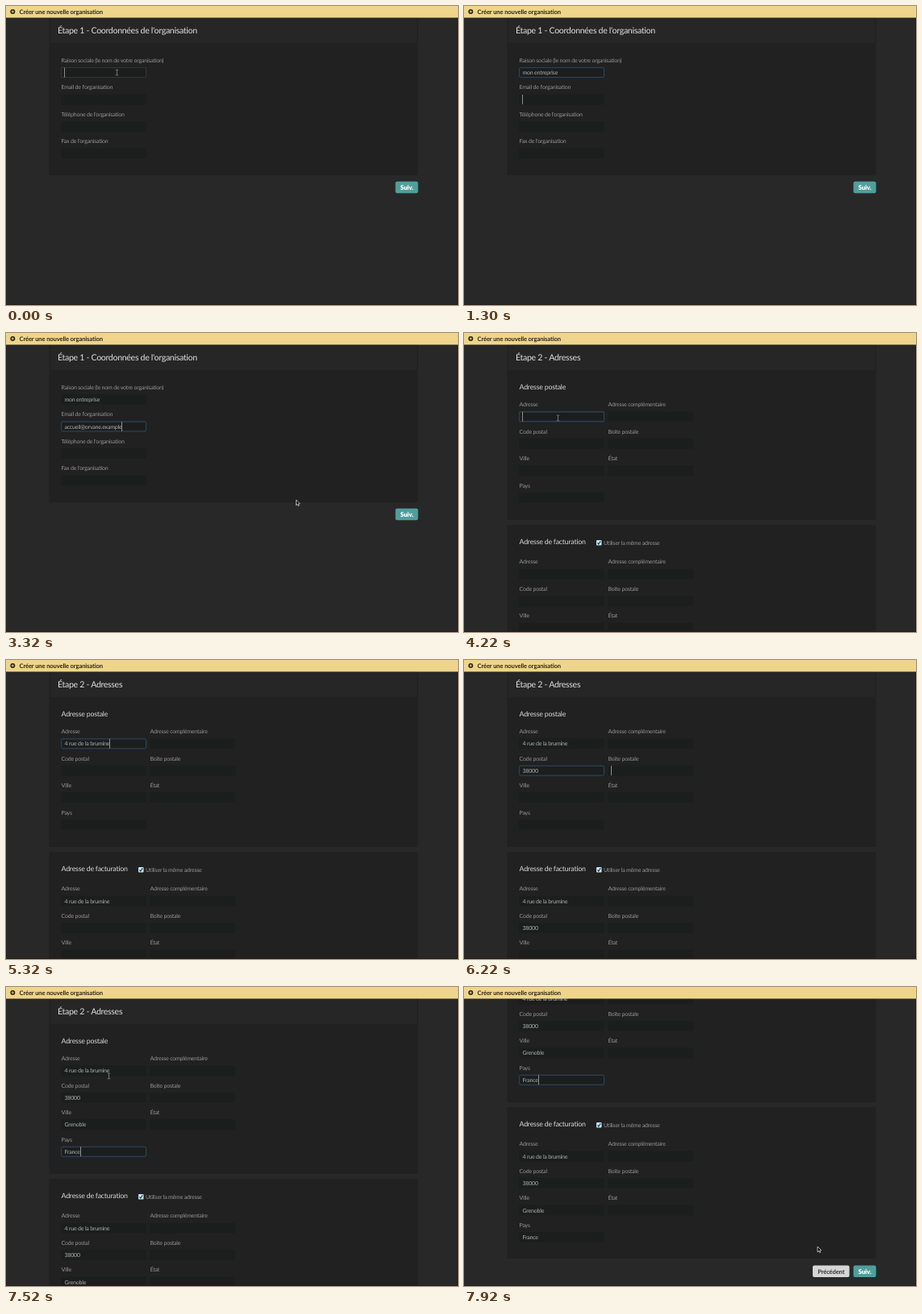
Write an HTML page with a canvas that moves like this. It is 560 by 371 pixels and loops after 8000 ms.

```html
<!DOCTYPE html>
<html lang="fr">
<head>
<meta charset="utf-8">
<title>Créer une nouvelle organisation</title>
<style>
  html, body { margin: 0; width: 100%; height: 100%; overflow: hidden; background: #282828; }
  canvas { display: block; width: 560px; height: 371px; }
</style>
</head>
<body>
<canvas id="stage"></canvas>
<script>
const W = 560, H = 371, LOOP = 8000;
const canvas = document.getElementById('stage');
const ctx = canvas.getContext('2d');
const dpr = window.devicePixelRatio || 1;
canvas.width = W * dpr;
canvas.height = H * dpr;

const FAMILY = 'Lato, "Open Sans", sans-serif';
const STYLES = {
  banner:  { weight: 700, size: 7.6, gap: -0.12, color: '#2c2718' },
  title:   { weight: 400, size: 10.6, gap: -0.32, color: '#dedede' },
  heading: { weight: 400, size: 8.8, gap: -0.22, color: '#d8d8d8' },
  label:   { weight: 400, size: 7, gap: -0.2, color: '#959595' },
  value:   { weight: 400, size: 7, gap: -0.2, color: '#b0b0b0' },
  light:   { weight: 900, size: 8, gap: -0.2, color: '#ffffff' },
  dark:    { weight: 700, size: 7.6, gap: -0.15, color: '#333333' }
};

const COL = [68, 178], ROW = 33.5, FIELD_W = 106, FIELD_H = 13;
const SWITCH = 3620;

const contactFields = [
  { label: 'Raison sociale (le nom de votre organisation)', col: 0, row: 0 },
  { label: "Email de l'organisation", col: 0, row: 1 },
  { label: "Téléphone de l'organisation", col: 0, row: 2 },
  { label: "Fax de l'organisation", col: 0, row: 3 }
];
const addressFields = [
  { label: 'Adresse', col: 0, row: 0 },
  { label: 'Adresse complémentaire', col: 1, row: 0 },
  { label: 'Code postal', col: 0, row: 1 },
  { label: 'Boîte postale', col: 1, row: 1 },
  { label: 'Ville', col: 0, row: 2 },
  { label: 'État', col: 1, row: 2 },
  { label: 'Pays', col: 0, row: 3 }
];

// Each visit to a field: focus span, then the typing span.
const contactEdits = [
  { field: 0, focus: 0, blur: 1300, text: 'mon entreprise', from: 210, to: 1180 },
  { field: 1, focus: 1300, blur: 9999, text: 'accueil@orvane.example', from: 1450, to: 3100 }
];
const addressEdits = [
  { field: 0, focus: 4060, blur: 5420, text: '4 rue de la brumine', from: 4330, to: 5260 },
  { field: 1, focus: 5420, blur: 5620, text: '', from: 0, to: 1 },
  { field: 2, focus: 5620, blur: 6220, text: '38000', from: 5680, to: 6120 },
  { field: 3, focus: 6220, blur: 6320, text: '', from: 0, to: 1 },
  { field: 4, focus: 6320, blur: 6920, text: 'Grenoble', from: 6400, to: 6820 },
  { field: 5, focus: 6920, blur: 7020, text: '', from: 0, to: 1 },
  { field: 6, focus: 7020, blur: 9999, text: 'France', from: 7080, to: 7400 }
];

// Pointer paths as [time, x, y]; hidden while typing.
const paths = [
  [[0, 137.5, 82.5], [299, 137.5, 82.5]],
  [[3120, 137.5, 82.5], [3320, 359.5, 207], [3520, 496, 223], [3720, 496, 223], [4120, 116.5, 105.5], [4400, 116.5, 105.5]],
  [[7420, 118, 106], [7520, 127.5, 110.5], [7620, 210, 170], [7820, 425, 315], [7920, 438, 322], [8000, 438, 322]]
];

const clamp = v => Math.max(0, Math.min(1, v));
const smooth = v => v * v * (3 - 2 * v);
const tick = t => t < 2120 ? Math.floor(t / 100) * 100 : Math.floor((t - 20) / 100) * 100 + 20;

function box(x, y, w, h, fill, radius = 0) {
  ctx.fillStyle = fill;
  ctx.beginPath();
  ctx.roundRect(x, y, w, h, radius);
  ctx.fill();
}

function line(points, color, width) {
  ctx.strokeStyle = color;
  ctx.lineWidth = width;
  ctx.beginPath();
  points.forEach(([x, y]) => ctx.lineTo(x, y));
  ctx.stroke();
}

function setStyle(name) {
  const s = STYLES[name];
  ctx.font = `${s.weight} ${s.size}px ${FAMILY}`;
  ctx.letterSpacing = s.gap + 'px';
  ctx.textRendering = 'geometricPrecision';
  ctx.fillStyle = s.color;
}

function text(str, x, y, name, align = 'left') {
  setStyle(name);
  ctx.textAlign = align;
  ctx.fillText(str, x, y);
  return ctx.measureText(str).width;
}

function pointerAt(t) {
  for (const path of paths) {
    for (let i = 1; i < path.length; i++) {
      const [t0, x0, y0] = path[i - 1], [t1, x1, y1] = path[i];
      if (t >= t0 && t <= t1) {
        const k = smooth((t - t0) / (t1 - t0));
        return { x: x0 + (x1 - x0) * k, y: y0 + (y1 - y0) * k };
      }
    }
  }
  return null;
}

function inside(p, x, y, slack) {
  return p && p.x > x && p.x < x + FIELD_W && p.y > y - slack && p.y < y + FIELD_H + slack;
}

function drawInput(x, y, edit, t, mouse, editable) {
  box(x, y, FIELD_W, FIELD_H, '#1c1e1e', 1.5);
  const glow = edit && editable ? clamp((t - edit.focus) / 150) * (1 - clamp((t - edit.blur) / 150)) : 0;
  if (editable && inside(mouse, x, y, 0)) {
    ctx.strokeStyle = '#333535';
    ctx.lineWidth = 1;
    ctx.strokeRect(x + 0.5, y + 0.5, FIELD_W - 1, FIELD_H - 1);
  }
  if (glow > 0) {
    ctx.save();
    ctx.globalAlpha = glow;
    ctx.shadowColor = '#24384a';
    ctx.shadowBlur = 1.5 * dpr;
    ctx.strokeStyle = '#2c4253';
    ctx.lineWidth = 1;
    ctx.beginPath();
    ctx.roundRect(x + 0.5, y + 0.5, FIELD_W - 1, FIELD_H - 1, 1.5);
    ctx.stroke();
    ctx.restore();
  }
  if (!edit) return;
  const count = Math.round(edit.text.length * clamp((t - edit.from) / (edit.to - edit.from)));
  const width = text(edit.text.slice(0, count), x + 4.5, y + 9, 'value');
  if (editable && t >= edit.focus && t < edit.blur) {
    box(Math.round(x + 4.2 + width), y + 0.5, 1, 12, '#8e8e8e');
  }
}

function drawForm(fields, edits, top, t, mouse, editable = true) {
  fields.forEach((f, i) => {
    const x = COL[f.col], y = top + f.row * ROW;
    text(f.label, x + 0.5, y - 6.2, 'label');
    drawInput(x, y, edits.find(e => e.field === i), t, mouse, editable);
  });
}

function drawPanel(y, h) {
  box(53.5, y, 457, h, '#212121', 1);
}

function drawHeader(title) {
  box(55, 15, 454, 31, '#262626');
  text(title, 64, 34, 'title');
}

function drawButton(str, x, y, w, fill, style) {
  box(x, y, w, 14.5, fill, 2);
  text(str, x + w / 2, y + 10, style, 'center');
}

const drawNext = y => drawButton('Suiv.', 482.5, y, 28, '#4f9f9d', 'light');

function drawContactPage(t, mouse) {
  drawPanel(14, 196);
  drawHeader("Étape 1 - Coordonnées de l'organisation");
  drawForm(contactFields, contactEdits, 76, t, mouse);
  drawNext(217.8);
}

function drawCheckbox(x, y) {
  box(x, y, 6.5, 6.5, '#c3e6f3', 1);
  line([[x + 1.5, y + 3.3], [x + 2.8, y + 5], [x + 5.2, y + 1.2]], '#173542', 1.1);
}

function drawAddressPage(t, mouse) {
  ctx.save();
  ctx.translate(0, -Math.round(89 * smooth(clamp((t - 7560) / 340))));
  drawPanel(14, 218);
  drawHeader('Étape 2 - Adresses');
  text('Adresse postale', 68.5, 70.3, 'heading');
  drawForm(addressFields, addressEdits, 97.3, t, t < 7520 ? mouse : null);

  drawPanel(238, 188);
  text('Adresse de facturation', 68.5, 262.4, 'heading');
  drawCheckbox(164, 257);
  text('Utiliser la même adresse', 173, 262.5, 'label');
  drawForm(addressFields, addressEdits, 292.5, t, null, false);

  drawButton('Précédent', 432, 434.5, 45.5, '#d6d6d6', 'dark');
  drawNext(434.5);
  ctx.restore();
}

function drawBanner() {
  box(0, 0, W, 14.6, '#efd58b');
  ctx.fillStyle = '#2c2718';
  ctx.beginPath();
  ctx.arc(8.3, 7, 3, 0, 7);
  ctx.fill();
  line([[6.7, 7], [9.9, 7]], '#efd58b', 0.9);
  line([[8.3, 5.4], [8.3, 8.6]], '#efd58b', 0.9);
  text('Créer une nouvelle organisation', 16.5, 9.7, 'banner');
}

function drawArrow({ x, y }) {
  ctx.beginPath();
  [[0, 0], [0, 6.8], [1.6, 5.4], [2.7, 7.7], [3.7, 7.2], [2.7, 5], [4.8, 4.8]]
    .forEach(([dx, dy]) => ctx.lineTo(x + dx, y + dy));
  ctx.closePath();
  ctx.fillStyle = '#0c0c0c';
  ctx.fill();
  ctx.strokeStyle = '#d4d4d4';
  ctx.lineWidth = 0.8;
  ctx.stroke();
}

function drawBeam({ x, y }) {
  line([[x, y - 3], [x, y + 3]], '#808080', 0.9);
  for (const end of [-3.3, 3.3]) line([[x - 1.8, y + end], [x + 1.8, y + end]], '#808080', 0.8);
}

function drawPointer(t, p) {
  const [fields, top] = t < SWITCH ? [contactFields, 76] : [addressFields, 97.3];
  const over = fields.some(f => inside(p, COL[f.col], top + f.row * ROW, 2));
  if (over && t < 7600) drawBeam(p);
  else drawArrow(p);
}

function draw(now) {
  const t = tick(now % LOOP);
  const mouse = pointerAt(t);
  ctx.setTransform(dpr, 0, 0, dpr, 0, 0);
  box(0, 0, W, H, '#282828');
  if (t < SWITCH) drawContactPage(t, mouse);
  else drawAddressPage(t, mouse);
  box(0, H - 1, W, 1, '#241d1d');
  box(W - 1, 0, 1, H, '#201c1c');
  drawBanner();
  if (mouse) drawPointer(t, mouse);
}

let start;
function frame(now) {
  start ??= now;
  draw(Math.max(0, now - start));
  requestAnimationFrame(frame);
}
requestAnimationFrame(frame);
</script>
</body>
</html>
```
